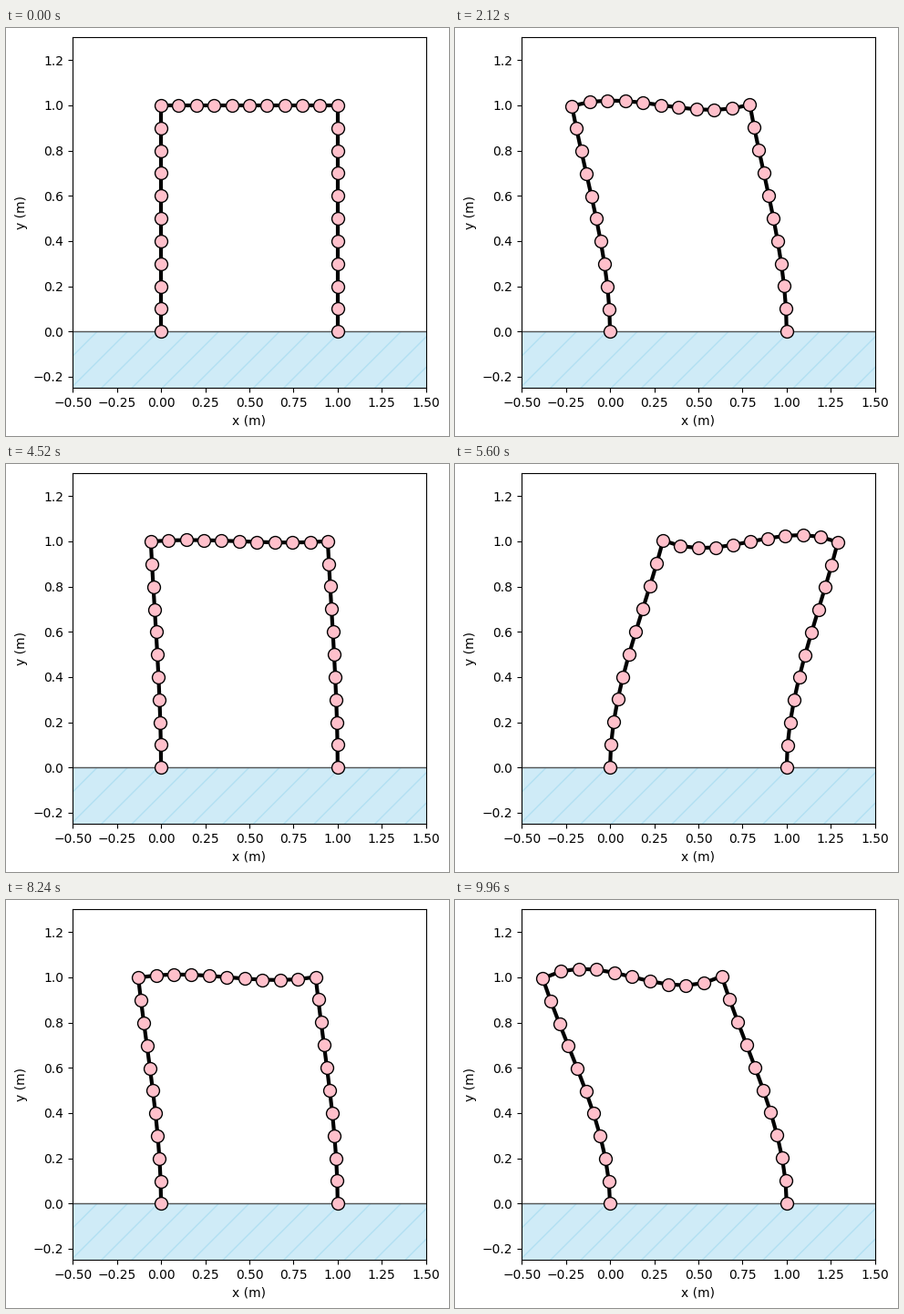
These frames come from a looping animation (486 by 448 pixels, 10 s). A matplotlib script:

```python
import numpy as np
import matplotlib.pyplot as plt
from matplotlib.animation import FuncAnimation
from matplotlib.patches import Rectangle

W, H, DPI = 486, 448, 100
FRAMES, INTERVAL = 250, 40

# Sway of the left corner: time (s), displacement (m), velocity (m/s)
SWAY = np.array([
    (0.00, 0.000, 0.00), (0.54, 0.455, 0.00), (1.04, 0.225, -0.50),
    (2.12, -0.216, -0.38), (3.32, -0.462, 0.00), (3.52, -0.450, 0.12),
    (4.16, -0.268, 0.50), (4.52, -0.058, 0.56), (5.20, 0.225, 0.27),
    (6.00, 0.322, 0.00), (6.24, 0.312, -0.08), (6.92, 0.219, -0.20),
    (7.28, 0.136, -0.25), (8.24, -0.129, -0.27), (9.36, -0.376, -0.19),
    (9.70, -0.418, 0.00), (9.96, -0.381, 0.27),
])

# Corner motion per unit of sway
RIGHT_SWAY = 0.965
ROT_LEFT, ROT_RIGHT = 1.12, 1.08
LIFT_LEFT, LIFT_RIGHT = 0.013, -0.012

S = np.linspace(0, 1, 11)


def hermite(s, a, b, da, db):
    """Cubic from a to b with end slopes da and db, for s in 0..1."""
    return (a + (b - a) * (3 * s**2 - 2 * s**3)
            + da * (s - 2 * s**2 + s**3) + db * (s**3 - s**2))


def sway(t):
    k = min(max(np.searchsorted(SWAY[:, 0], t) - 1, 0), len(SWAY) - 2)
    (t0, a, va), (t1, b, vb) = SWAY[k], SWAY[k + 1]
    dt = t1 - t0
    return hermite((t - t0) / dt, a, b, va * dt, vb * dt)


def column(x0, top, slope, lift):
    return x0 + hermite(S, 0, top, 0, slope), S * (1 + lift)


def portal(u):
    """Node positions from the left foot over the beam to the right foot."""
    ur = RIGHT_SWAY * u
    lx, ly = column(0, u, ROT_LEFT * u, LIFT_LEFT * u)
    rx, ry = column(1, ur, ROT_RIGHT * u, LIFT_RIGHT * u)
    bx = S + u + (ur - u) * S
    by = hermite(S, ly[-1], ry[-1], -ROT_LEFT * u, -ROT_RIGHT * u)
    x = np.concatenate([lx, bx[1:], rx[-2::-1]])
    y = np.concatenate([ly, by[1:], ry[-2::-1]])
    return x, y


fig = plt.figure(figsize=(W / DPI, H / DPI), dpi=DPI, facecolor="white")
ax = fig.add_axes([73.2 / W, 52.6 / H, 387.5 / W, 385 / H])
ax.set_xlim(-0.5, 1.5)
ax.set_ylim(-0.25, 1.3)
ax.set_xticks(np.arange(-0.5, 1.51, 0.25))
ax.set_yticks(np.arange(-1, 7) * 0.2)
ax.set_xlabel("x (m)")
ax.set_ylabel("y (m)")

ax.add_patch(Rectangle((-0.6, -0.4), 2.2, 0.4, facecolor="skyblue",
                       edgecolor="skyblue", hatch="/", alpha=0.4))
ax.axhline(0, color="#555555", lw=1)

frame_line, = ax.plot(*portal(0), "o-", color="black", lw=3, markersize=10,
                      markerfacecolor="pink", markeredgecolor="black",
                      markeredgewidth=1, zorder=3)


def update(i):
    frame_line.set_data(*portal(sway(i * INTERVAL / 1000)))
    return frame_line,


anim = FuncAnimation(fig, update, frames=FRAMES, interval=INTERVAL,
                     repeat=True, repeat_delay=0)
plt.show()
```
